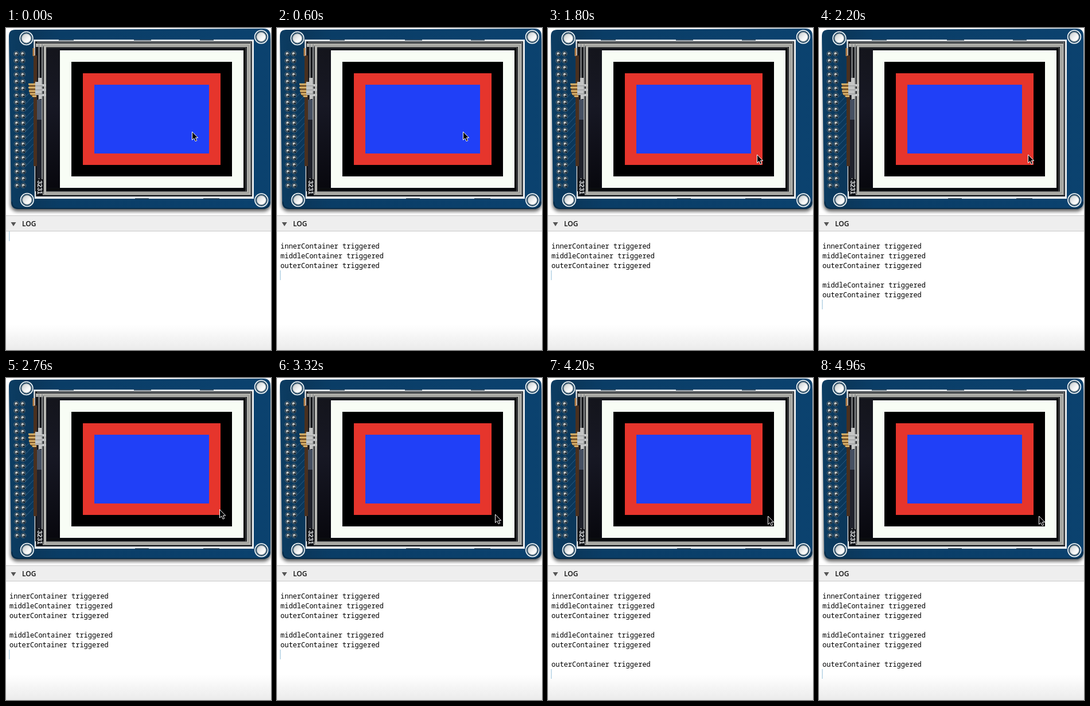
An HTML page for the animation above (5000 ms loop, 462x562 px).

```html
<!DOCTYPE html>
<html>
<head>
<meta charset="utf-8">
<style>
  html, body { margin: 0; width: 100%; height: 100%; overflow: hidden; background: #fff; }
  svg { display: block; }
  .log { font: 12px "Noto Sans Mono", monospace; fill: #000; }
  .title { font: 600 12px "Open Sans", sans-serif; fill: #111; }
  .mark { font: bold 11px "Liberation Sans", sans-serif; fill: #eceef0; }
</style>
</head>
<body>
<svg width="462" height="562" viewBox="0 0 462 562">
  <defs>
    <linearGradient id="pcb" x2="1" y2="0">
      <stop offset="0" stop-color="#0c3d63"/>
      <stop offset=".08" stop-color="#0b375a"/>
      <stop offset=".2" stop-color="#0a3d66"/>
      <stop offset="1" stop-color="#0b426f"/>
    </linearGradient>
    <linearGradient id="glass" x2="0" y2="1">
      <stop offset="0" stop-color="#14151c"/>
      <stop offset=".4" stop-color="#171824"/>
      <stop offset="1" stop-color="#08080e"/>
    </linearGradient>
    <linearGradient id="steel" x2="1" y2="1">
      <stop offset="0" stop-color="#c3c8cb"/>
      <stop offset=".6" stop-color="#f7f8f8"/>
      <stop offset="1" stop-color="#fff"/>
    </linearGradient>
    <linearGradient id="fade" x2="0" y2="1">
      <stop offset="0" stop-color="#fff"/>
      <stop offset="1" stop-color="#ebebeb"/>
    </linearGradient>
    <filter id="soft" x="-5%" y="-5%" width="110%" height="112%"><feGaussianBlur stdDeviation="3"/></filter>
    <g id="hole">
      <circle r="11.3" fill="#0a3557" stroke="#e6edf0" stroke-width="1.8"/>
      <circle r="8.3" fill="url(#steel)" stroke="#8d999f" stroke-width="1.4"/>
    </g>
    <g id="pin">
      <circle r="4.4" fill="#0a2439" stroke="#5c7383" stroke-width="1"/>
      <circle r="2.9" fill="#7d878b"/>
      <circle cx="-.6" cy="-.8" r="1.7" fill="#d5d8d8"/>
      <path d="M0 1l3 2" stroke="#141d25" stroke-width="1.8"/>
    </g>
  </defs>

  <rect x="8" y="12" width="453" height="308" rx="12" opacity=".65" filter="url(#soft)"/>
  <path id="board" d="M5 14Q5 3 16 3L449 1Q461 1 461 13V304Q461 315 450 315L21 316Q9 316 9 304z" fill="url(#pcb)"/>
  <path d="M10 303q1 12 12 12H448q10 0 12-12" fill="none" stroke="#082c49" stroke-width="2"/>
  <g id="traces" stroke="#2b5c84"></g>
  <g id="pins"></g>

  <!-- display frame -->
  <path d="M48 21H432V298H50z" fill="#15171d"/>
  <path d="M48 21.8H432" stroke="#e9edef" stroke-width="3"/>
  <path d="M430.5 21V298" stroke="#eef0f1" stroke-width="3"/>
  <path d="M50 296H432" stroke="#e9edef" stroke-width="4"/>
  <path d="M49.5 22V50M51 240V297" stroke="#e4e8ea" stroke-width="2.5"/>
  <path d="M54 25H427V292" fill="none" stroke="#777c7e" stroke-width="1.5"/>
  <path d="M52 30H423V288.5H53" fill="none" stroke="#b5b5b0" stroke-width="6"/>
  <path d="M66 30H423V288H66" fill="none" stroke="#8b8c88"/>
  <path d="M58 34H418V285" fill="none" stroke="#6d6e6b"/>
  <rect x="51" y="34" width="17" height="251" fill="#17181d"/>
  <rect x="71" y="36" width="345" height="243" fill="url(#glass)"/>
  <path d="M71 281.5H415.5V35" fill="none" stroke="#090a0c" stroke-width="4"/>
  <path d="M57.5 28V264M63 28V288" stroke="#8f9293" stroke-width="2"/>
  <path d="M68 32V290" stroke="#b8b8b4" stroke-width="4"/>
  <path d="M65.5 31V290" stroke="#3c3e40"/>
  <path d="M92 21h26m105 0h30m85 0h24M225 298h24m95 0h28" stroke="#18334a" stroke-width="1.5"/>

  <!-- touch ribbon -->
  <rect x="48" y="48" width="6" height="193" fill="#49301f"/>
  <rect x="54" y="125" width="8" height="35" fill="#465062"/>
  <rect x="54" y="160" width="8" height="102" fill="#20222c"/>
  <path d="M48 35v14" stroke="#b27b45" stroke-width="3"/>
  <path d="M40 97h9l3-6v30h-5l-6-6z" fill="#7d592e"/>
  <path d="M39 98h14M39 104h14M40 110h13M42 115h11M46 119h7" stroke="#e5bd72" stroke-width="2.3"/>
  <path d="M51 94h5v-7h6v11h8v4h-8v4h8v4h-8v5h8v4h-8v5h-5v-7h-6z" fill="#c4c5c5"/>
  <path d="M51 101h13M51 108h13M51 115h13" stroke="#8a8c8e"/>
  <rect x="53" y="264" width="11" height="28" fill="#101217"/>
  <text class="mark" transform="translate(55 266) rotate(90)">3231</text>

  <use href="#hole" x="35.5" y="18"/>
  <use href="#hole" x="445" y="15.5"/>
  <use href="#hole" x="36.8" y="300"/>
  <use href="#hole" x="445.3" y="300.5"/>

  <!-- nested containers -->
  <rect x="94" y="39" width="320" height="240" fill="#f8fdf5"/>
  <rect x="114" y="59" width="280" height="200"/>
  <rect x="134" y="79" width="240" height="160" fill="#e6352c"/>
  <rect x="154" y="99" width="200" height="120" fill="#2040f7"/>

  <!-- log panel -->
  <rect y="327" width="462" height="235" fill="#fff"/>
  <rect y="327" width="462" height="28" fill="#eee"/>
  <path d="M0 327.5H462M0 354.5H462" stroke="#c9c9c9"/>
  <path d="M8.5 339H17.5L13 346z" fill="#555"/>
  <text class="title" x="28" y="346">LOG</text>
  <rect y="518" width="462" height="44" fill="url(#fade)"/>
  <g id="log" class="log"></g>
  <rect id="caret" x="5" width="1.5" height="17" fill="#b5d3e5"/>

  <path id="cursor" d="M0 0V14.5L3.3 11.5L5.6 16.7L8.2 15.6L5.9 10.6H10.2z" stroke="#fff"/>
</svg>
<script>
const $ = id => document.getElementById(id);
const LOOP = 5000, STEP = 40, TOP = 355, LINE = 17;

const clicks = [
  [320, ['inner', 'middle', 'outer']],
  [2040, ['middle', 'outer']],
  [3720, ['outer']],
];
// time, x, y of the pointer tip
const path = [
  [0, 324.5, 181], [1240, 324.5, 181], [1400, 328.5, 185], [1800, 364.5, 221],
  [2520, 364.5, 221], [3000, 380.5, 238], [3360, 380.5, 238], [3560, 383.5, 241], [LOOP, 383.5, 241],
];

for (let i = 0; i < 20; i++) {
  const y = 45 + i * 12.1;
  for (const x of [18, 29]) $('pins').innerHTML += `<use href="#pin" x="${x + i * .07}" y="${y}"/>`;
  if (i > 5 && i < 17) $('traces').innerHTML += `<path d="M33 ${y + 4}L48 ${y - 12}"/>`;
}

let row = 0;
for (const click of clicks) {
  const first = row + 1;
  const lines = click[1].map((name, i) =>
    `<text x="6" y="${TOP + (first + i) * LINE + 13}">${name}Container triggered</text>`);
  $('log').innerHTML += `<g>${lines.join('')}</g>`;
  row = click[2] = first + lines.length;
}

function pointerAt(t) {
  const i = path.findIndex(key => key[0] > t);
  const [t0, x0, y0] = path[i - 1], [t1, x1, y1] = path[i];
  const p = (t - t0) / (t1 - t0), e = p * p * (3 - 2 * p);
  return [x0 + (x1 - x0) * e, y0 + (y1 - y0) * e];
}

function draw() {
  const t = Math.floor(performance.now() % LOOP / STEP) * STEP;
  let caretRow = 0;
  clicks.forEach(([time, , endRow], i) => {
    const shown = t >= time;
    $('log').children[i].setAttribute('visibility', shown ? 'visible' : 'hidden');
    if (shown) caretRow = endRow;
  });
  $('caret').setAttribute('y', TOP + caretRow * LINE);
  $('cursor').setAttribute('transform', `translate(${pointerAt(t)})`);
  requestAnimationFrame(draw);
}
draw();
</script>
</body>
</html>
```
